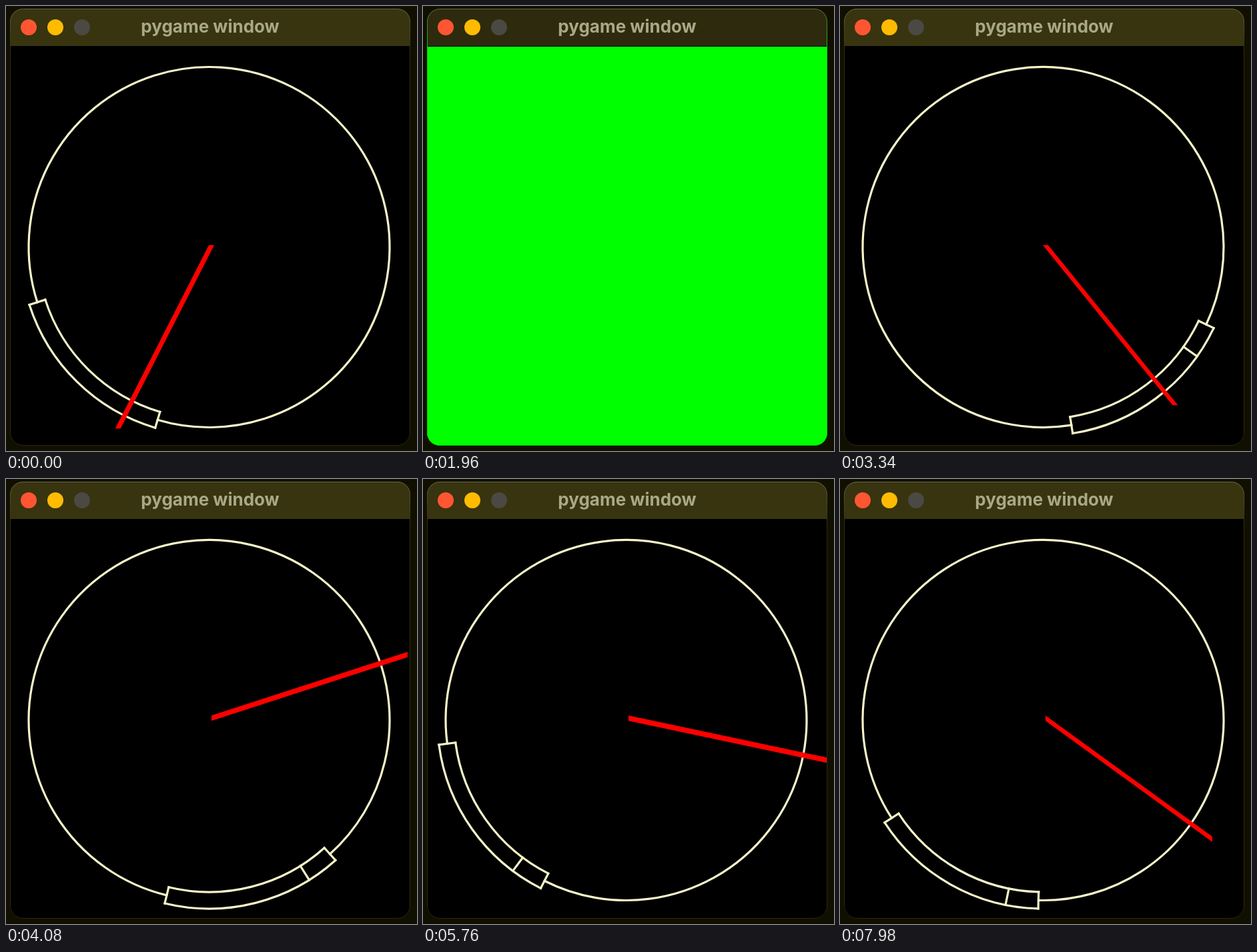
These frames come from a looping animation (616 px wide and 668 px high, 8000 ms). An HTML page with a canvas:

```html
<!DOCTYPE html>
<html lang="en">
<head>
<meta charset="utf-8">
<title>pygame window</title>
<style>
  html, body { margin: 0; width: 100%; height: 100%; overflow: hidden; background: #111000; }
  canvas { display: block; }
</style>
</head>
<body>
<canvas width="616" height="668"></canvas>
<script>
const ctx = document.querySelector('canvas').getContext('2d');
const LOOP = 8000;
const DIAL = { x: 304.5, y: 362, r: 270.5, half: 12.5 };
const PIVOT = { x: 308, y: 359, length: 309 };
const ZONE_WIDTH = 55.6, PERFECT_WIDTH = 10;
const TURNS_PER_TICK = 66 / 39;   // needle turns of 3 degrees per visible tick
const FLASH_TICK = 43;

// Each round: the tick at which the needle leaves the top, and where its zone begins.
const rounds = [
  { start: -39.8, zone: 196.6 },
  { start: 2, zone: 192.6 },
  { start: 44, zone: 115.4 },
  { start: 75, zone: 138 },
  { start: 105, zone: 206.9 },
  { start: 147, zone: 181.5 }
];

// Ticks arrive in threes, 20 ms apart, followed by a pause.
function tickAt(time) {
  const shifted = time + 20;
  return 3 * Math.floor(shifted / 140) + Math.min(2, Math.floor(shifted % 140 / 20));
}

// Degrees run clockwise from the top.
const radians = degrees => (degrees - 90) * Math.PI / 180;

function arc(radius, from, to) {
  ctx.beginPath();
  ctx.arc(DIAL.x, DIAL.y, radius, radians(from), radians(to));
  ctx.stroke();
}

function spoke(degrees) {
  const a = radians(degrees);
  ctx.beginPath();
  for (const r of [DIAL.r - DIAL.half, DIAL.r + DIAL.half]) {
    ctx.lineTo(DIAL.x + r * Math.cos(a), DIAL.y + r * Math.sin(a));
  }
  ctx.stroke();
}

function drawDial(zone) {
  const end = zone + ZONE_WIDTH;
  ctx.strokeStyle = '#f6f4c8';
  ctx.lineWidth = 3.2;
  ctx.lineCap = 'square';
  arc(DIAL.r, end, zone + 360);
  arc(DIAL.r - DIAL.half, zone, end);
  arc(DIAL.r + DIAL.half, zone, end);
  [zone, zone + PERFECT_WIDTH, end].forEach(spoke);
}

// The line's thickness is measured along one axis, so its ends are cut straight.
function drawNeedle(degrees) {
  const a = radians(degrees);
  const dx = PIVOT.length * Math.cos(a), dy = PIVOT.length * Math.sin(a);
  const flat = Math.abs(dx) > Math.abs(dy);
  const ox = flat ? 0 : 4, oy = flat ? 4 : 0;
  ctx.fillStyle = '#f00';
  ctx.beginPath();
  ctx.moveTo(PIVOT.x - ox, PIVOT.y - oy);
  ctx.lineTo(PIVOT.x + ox, PIVOT.y + oy);
  ctx.lineTo(PIVOT.x + dx + ox, PIVOT.y + dy + oy);
  ctx.lineTo(PIVOT.x + dx - ox, PIVOT.y + dy - oy);
  ctx.fill();
}

function drawTitleBar(flash) {
  ctx.fillStyle = flash ? '#2e2a0e' : '#37340f';
  ctx.fillRect(6, 4, 600, 56);
  [['#ff5533', 34], ['#ffbb00', 74], ['#4b4943', 114]].forEach(([color, x]) => {
    ctx.fillStyle = color;
    ctx.beginPath();
    ctx.arc(x, 32, 12, 0, 2 * Math.PI);
    ctx.fill();
  });
  ctx.fillStyle = '#aaa987';
  ctx.font = '700 26px Inter, sans-serif';
  ctx.textAlign = 'center';
  ctx.fillText('pygame window', 306, 40);
}

function windowPath(inset) {
  ctx.beginPath();
  ctx.roundRect(6 + inset, 4 + inset, 600 - 2 * inset, 656 - 2 * inset, 19);
}

function draw(time) {
  const tick = tickAt(time);
  const flash = tick === FLASH_TICK;
  const round = rounds.findLast(r => r.start <= tick);

  ctx.fillStyle = '#111000';
  ctx.fillRect(0, 0, 616, 668);
  ctx.save();
  windowPath(0);
  ctx.clip();
  ctx.fillStyle = '#000';
  ctx.fillRect(6, 4, 600, 656);
  drawTitleBar(flash);

  ctx.beginPath();
  ctx.rect(6, 61, 600, 599);
  ctx.clip();
  if (flash) {
    ctx.fillStyle = '#0f0';
    ctx.fillRect(6, 61, 600, 599);
  } else {
    drawDial(round.zone);
    drawNeedle(3 * Math.round((tick - round.start) * TURNS_PER_TICK));
  }
  ctx.restore();

  // The rim is brighter along the title bar than around the content.
  const rim = ctx.createLinearGradient(0, 4, 0, 70);
  rim.addColorStop(0, '#66634a');
  rim.addColorStop(1, flash ? '#00d800' : '#2c2a10');
  ctx.strokeStyle = rim;
  ctx.lineWidth = 1;
  windowPath(0.5);
  ctx.stroke();
}

function frame() {
  draw(performance.now() % LOOP);
  requestAnimationFrame(frame);
}
frame();
</script>
</body>
</html>
```
